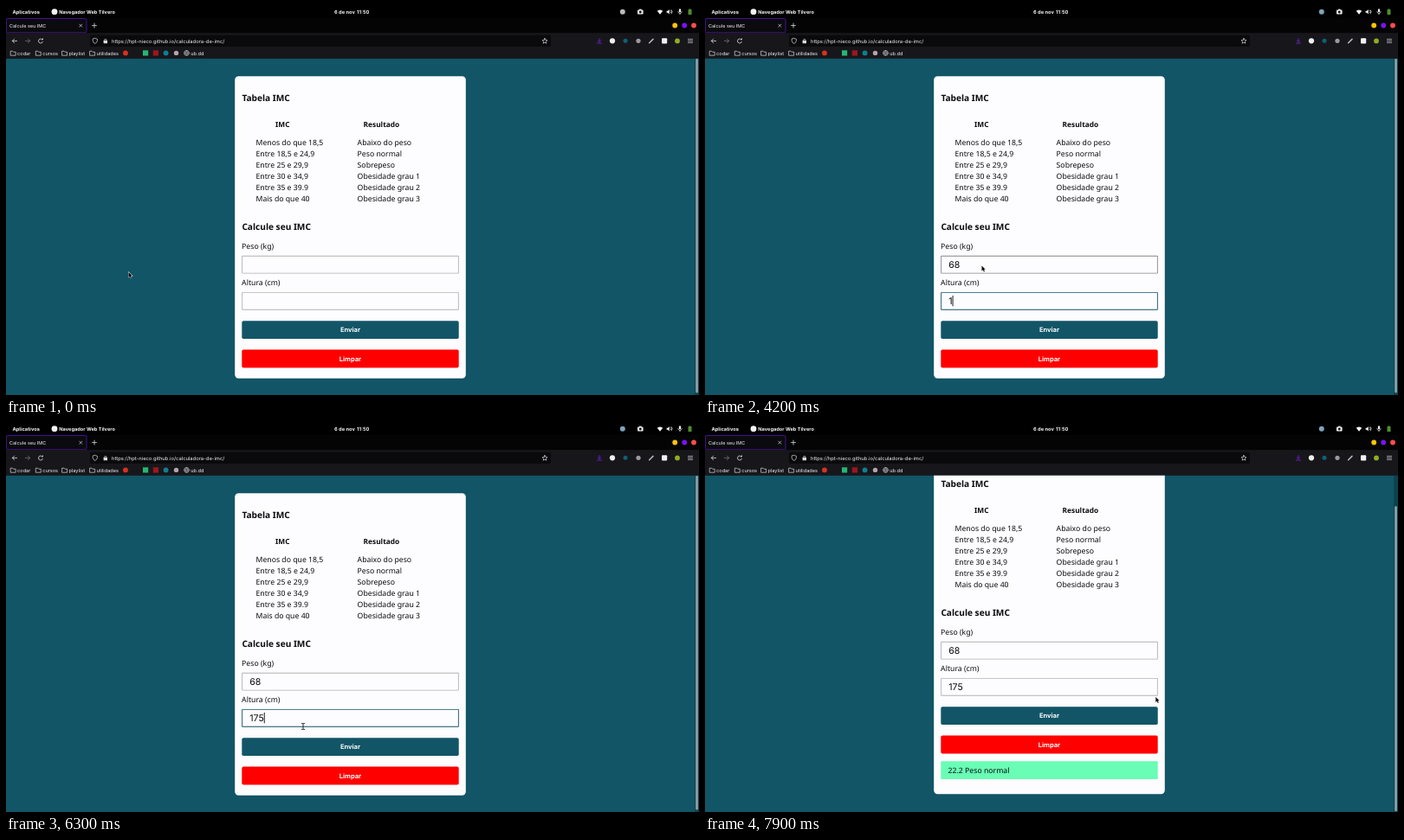
These frames come from a looping animation (800x450 px, 8 s). An HTML page with a canvas:

```html
<!DOCTYPE html>
<html lang="pt-BR">
<head>
<meta charset="utf-8">
<title>Calcule seu IMC</title>
<style>
html, body { margin: 0; width: 100%; height: 100%; overflow: hidden; background: #000; }
canvas { display: block; width: 800px; height: 450px; }
</style>
</head>
<body>
<canvas id="stage" width="800" height="450"></canvas>
<script>
const ctx = document.getElementById('stage').getContext('2d');
const LOOP = 8000, STEP = 100, TOP = 60.5;
const TEAL = '#115566', INK = '#0b0b0d';
const UI = 'Inter, sans-serif', PAGE = '"Noto Sans", "Open Sans", sans-serif';

// ---------- helpers ----------
function text(s, x, y, size, { color = INK, weight = 400, family = PAGE, align = 'left' } = {}) {
  ctx.font = `${weight} ${size}px ${family}`;
  ctx.fillStyle = color;
  ctx.textAlign = align;
  ctx.fillText(s, x, y);
}

function rect(x, y, w, h, color, r = 0) {
  ctx.fillStyle = color;
  ctx.beginPath();
  ctx.roundRect(x, y, w, h, r);
  ctx.fill();
}

function dot(x, y, r, color) {
  ctx.fillStyle = color;
  ctx.beginPath();
  ctx.arc(x, y, r, 0, Math.PI * 2);
  ctx.fill();
}

function ring(x, y, r, color, from = 0, to = Math.PI * 2, w = 0.8) {
  ctx.strokeStyle = color;
  ctx.lineWidth = w;
  ctx.beginPath();
  ctx.arc(x, y, r, from, to);
  ctx.stroke();
}

// Strokes and/or fills an SVG path placed at x, y.
function glyph(d, x, y, { stroke, fill, w = 0.8 } = {}) {
  const p = new Path2D(d);
  ctx.save();
  ctx.translate(x, y);
  ctx.lineJoin = ctx.lineCap = 'round';
  if (stroke) { ctx.strokeStyle = stroke; ctx.lineWidth = w; ctx.stroke(p); }
  if (fill) { ctx.fillStyle = fill; ctx.fill(p); }
  ctx.restore();
}

const clamp = v => Math.max(0, Math.min(1, v));
const ramp = (t, start, span) => clamp((t - start) / span);

function mix(a, b, k) {
  const ch = (c, i) => parseInt(c.slice(i, i + 2), 16);
  return `rgb(${[1, 3, 5].map(i => Math.round(ch(a, i) + (ch(b, i) - ch(a, i)) * k))})`;
}

// Last value whose start time has passed.
const pick = (list, t) => list.reduce((v, [at, next]) => (t >= at ? next : v), list[0][1]);

// ---------- motion ----------
const PATH = [
  [0, 141.5, 308], [900, 141.5, 308], [1000, 178, 325], [1100, 248, 342], [1200, 304, 335],
  [1300, 324, 311], [1400, 321, 303], [1500, 319.5, 300.5], [5800, 319.5, 300.5],
  [5900, 319.5, 301.5], [6100, 319.5, 301.5], [6200, 324, 313], [6300, 343, 351],
  [6400, 365, 382], [6500, 370.3, 370.5], [7100, 370.3, 370.5], [7200, 400, 367],
  [7300, 455, 348], [7400, 505, 325], [7500, 520.3, 317], [8000, 520.3, 317]
];

function cursorAt(t) {
  const i = Math.max(1, PATH.findIndex(p => p[0] > t));
  const [t0, x0, y0] = PATH[i - 1], [t1, x1, y1] = PATH[i];
  const k = ramp(t, t0, t1 - t0);
  return [x0 + (x1 - x0) * k, y0 + (y1 - y0) * k];
}

const SHAPES = [
  [0, 'arrow'], [1100, 'beam'], [1200, 'beam'], [1300, 'arrow'], [1400, 'beam'],
  [4100, 'arrow'], [5300, 'beam'], [6200, 'arrow'], [6300, 'beam'],
  [6400, 'hand'], [7300, 'beam'], [7400, 'beam'], [7500, 'arrow']
];
const WEIGHT = [[0, ''], [2600, '6'], [2800, '68']];
const HEIGHT = [[0, ''], [4100, '1'], [4900, '17'], [5300, '175']];
const CARET = [[0, ''], [1700, 'w'], [3300, ''], [3500, 'h'], [5700, ''], [6300, 'h'], [6700, '']];
const SCROLL = [[0, 0], [7600, 6], [7700, 20], [7800, 31], [7900, 36]];

// ---------- browser window ----------
function folder(x, label) {
  glyph('M-3 2.4V-2.2H-.6L.3-1.2H3V2.4Z', x, 54.4, { stroke: '#d8d8dc', w: 0.7 });
  text(label, x + 4.9, 56.5, 5.6, { color: '#f0f0f3', family: UI });
}

function systemBar(t) {
  const bold = { color: '#f4f4f4', weight: 700, family: UI };
  rect(0, 0, 800, 14, '#000');
  text('Aplicativos', 7.4, 8.7, 5.75, bold);
  dot(56, 6.7, 3.4, '#f4f4f4');
  text('Navegador Web Tilvero', 61.3, 8.7, 5.65, bold);
  text('6 de nov', 379, 8.7, 5.75, bold);
  text('11:50', 405, 8.7, 5.75, bold);
  dot(711.8, 6.7, 3, t < 200 ? '#b9bbbd' : '#7fa3bd');
  rect(729, 4.6, 6.6, 5, '#eee', 0.8);
  rect(731, 3.6, 2.6, 1.4, '#eee');
  dot(732.3, 7, 1.4, '#111');
  glyph('M-3.2-1.4Q0-4 3.2-1.4L0 2.6Z', 755, 7.2, { fill: '#f4f4f4' });
  glyph('M-3-1H-1.6L.2-2.8V2.8L-1.6 1H-3Z', 765.6, 6.7, { fill: '#f4f4f4' });
  ring(765.8, 6.7, 2, '#f4f4f4', -0.9, 0.9, 0.7);
  ring(765.8, 6.7, 3.2, '#f4f4f4', -0.9, 0.9, 0.7);
  rect(776.9, 3.3, 2.2, 4, '#f4f4f4', 1.1);
  ring(778, 6.2, 2.2, '#f4f4f4', 0, Math.PI, 0.7);
  rect(777.6, 8.3, 0.8, 1.8, '#f4f4f4');
  rect(787.5, 4, 4, 6, '#4f8f2c', 0.6);
  rect(788.7, 3.2, 1.6, 1, '#4f8f2c');
}

function tabBar() {
  rect(0, 13.5, 800, 18, '#040405');
  rect(0, 14.5, 93, 16.5, '#0b0a0f', 1);
  ctx.strokeStyle = '#4b159c';
  ctx.lineWidth = 0.9;
  ctx.beginPath();
  ctx.roundRect(0.4, 14.5, 92.6, 16.3, 1.5);
  ctx.stroke();
  text('Calcule seu IMC', 4, 24.6, 5.5, { color: '#f2f2f5', family: UI });
  glyph('M-1.5-1.5L1.5 1.5M1.5-1.5L-1.5 1.5', 86.3, 22.6, { stroke: '#dcdce0', w: 0.7 });
  glyph('M-2.5 0H2.5M0-2.5V2.5', 102, 22.6, { stroke: '#dcdce0', w: 0.8 });
  dot(772.2, 22.5, 2.9, '#ffc400');
  dot(783.2, 22.5, 2.9, '#7a12f5');
  dot(794, 22.5, 2.9, '#ff4d4d');
}

function navBar() {
  const icon = '#dcdce0', dim = '#707076';
  rect(0, 31.3, 800, 29.2, '#17171b');
  rect(97, 33.7, 532, 13.4, '#0a0a0d', 1.7);
  glyph('M2.6 0H-2.6M-.4-2.3L-2.7 0L-.4 2.3', 10, 40.4, { stroke: icon });
  glyph('M-2.6 0H2.6M.4-2.3L2.7 0L.4 2.3', 25, 40.4, { stroke: dim });
  ring(40, 40.5, 2.5, icon, 0.2, 5.5);
  glyph('M.6-1H2.8V-3.2Z', 40, 40.2, { fill: icon });
  glyph('M0-3L2.6-2V0Q2.3 2.2 0 3.2Q-2.3 2.2-2.6 0V-2Z', 102.8, 40.3, { stroke: icon, w: 0.7 });
  rect(112.6, 39.8, 4.4, 3.4, icon, 0.5);
  ring(114.8, 39.7, 1.4, icon, Math.PI, Math.PI * 2, 0.7);
  text('https://hpt-nieco.github.io/calculadora-de-imc/', 122, 42.6, 5.83, { color: '#f0f0f3', family: UI });
  glyph('M0-3L.9-1 3-.8 1.4.7 1.9 2.8 0 1.7-1.9 2.8-1.4.7-3-.8-.9-1Z', 622, 40.4, { stroke: icon, w: 0.7 });

  glyph('M0-2.8V1M-1.6-.5L0 1 1.6-.5M-2.6 2.6H2.6', 685, 40.4, { stroke: '#7a1fe0', w: 0.8 });
  dot(700, 40.3, 3.1, '#f0f0f0');
  dot(715, 40.3, 2.5, '#0d6275');
  dot(730, 40.3, 2.6, '#9a9aa0');
  glyph('M-2.4 2.4L2 -2', 745, 40.4, { stroke: '#b8b8bd', w: 1.5 });
  rect(757, 37.3, 6.2, 6.2, '#f2f2f2', 1);
  dot(775, 40.4, 2.9, '#8fae22');
  glyph('M-2.6-2H2.6M-2.6 0H2.6M-2.6 2H2.6', 790, 40.4, { stroke: icon, w: 0.7 });

  folder(8.2, 'codar');
  folder(37.3, 'cursos');
  folder(67.6, 'playlist');
  folder(99.6, 'utilidades');
  dot(138, 54.4, 2.9, '#d8321f');
  rect(158, 51.3, 6.2, 6.2, '#27b573');
  rect(169.8, 51.3, 6.2, 6.2, '#9c1620');
  dot(184.6, 54.4, 2.9, '#0e7f92');
  dot(196.5, 54.4, 2.7, '#b5a3a8');
  ring(208.5, 54.4, 2.8, icon, 0, Math.PI * 2, 0.7);
  glyph('M-2.8 0H2.8M0-2.8Q-2.6 0 0 2.8Q2.6 0 0-2.8', 208.5, 54.4, { stroke: icon, w: 0.5 });
  text('ub.dd', 213.2, 56.5, 5.6, { color: '#f0f0f3', family: UI });
}

// ---------- page ----------
const ROWS = [
  ['Menos do que 18,5', 'Abaixo do peso'],
  ['Entre 18,5 e 24,9', 'Peso normal'],
  ['Entre 25 e 29,9', 'Sobrepeso'],
  ['Entre 30 e 34,9', 'Obesidade grau 1'],
  ['Entre 35 e 39.9', 'Obesidade grau 2'],
  ['Mais do que 40', 'Obesidade grau 3']
];

function field(y, value, border, caret) {
  rect(272.2, y, 250.6, 20.8, border, 0.8);
  rect(273.1, y + 0.9, 248.8, 19, '#fdfcff');
  text(value, 281.2, y + 14.2, 10.6, { family: UI });
  if (caret) rect(281.3 + ctx.measureText(value).width, y + 4.2, 0.9, 12.2, '#000');
}

function button(y, label, color) {
  rect(272.3, y, 250.4, 20.9, color, 1.8);
  text(label, 397.5, y + 13.1, 7.5, { color: '#fff', weight: 700, family: UI, align: 'center' });
}

function page(t, [cx, cy]) {
  const sent = t >= 6700;
  const scroll = pick(SCROLL, t);
  const caret = pick(CARET, t);
  const inField = y => cx > 272 && cx < 523 && cy > y && cy < y + 21;
  const idle = (y, base) => (inField(y) ? '#85868c' : base);

  ctx.save();
  ctx.beginPath();
  ctx.rect(0, TOP, 800, 450 - TOP);
  ctx.clip();
  rect(0, TOP, 800, 390, TEAL);

  ctx.translate(0, -scroll);
  rect(264.2, 81.3, 266.6, sent ? 384 : 349.5, '#fdfcff', 4.2);
  text('Tabela IMC', 272.4, 109.8, 10.15, { weight: 700 });
  text('IMC', 319.3, 139.5, 8.33, { weight: 700, align: 'center' });
  text('Resultado', 433.4, 139.5, 8.33, { weight: 700, align: 'center' });
  ROWS.forEach(([range, result], i) => {
    const y = 161.1 + i * 13.03;
    text(range, 288.5, y, 8.7);
    text(result, 405.6, y, 8.7);
  });
  text('Calcule seu IMC', 272.4, 258.7, 10.15, { weight: 700 });
  text('Peso (kg)', 272.1, 281.3, 8.7);
  text('Altura (cm)', 272.1, 323.4, 8.7);

  const onWeight = ramp(t, 1600, 200) - ramp(t, 3300, 300);
  const onHeight = ramp(t, 3300, 300) - ramp(t, 6600, 300);
  const nearHeight = t >= 1100 && t < 1500 ? '#85868c' : '#b4b4b8';
  field(288.8, pick(WEIGHT, t), mix(idle(288.8, '#b0b0b4'), TEAL, onWeight), caret === 'w');
  field(330.9, pick(HEIGHT, t), mix(idle(330.9, nearHeight), TEAL, onHeight), caret === 'h');

  const hover = ramp(t, 6300, 200) - ramp(t, 7200, 200);
  button(364.2, 'Enviar', mix(TEAL, '#092e37', hover));
  button(397.6, 'Limpar', '#ff0000');
  if (sent) {
    rect(272.3, 427.2, 250.4, 20.8, '#69fdb5');
    text('22.2 Peso normal', 280.6, 440.9, 8.7);
  }
  ctx.restore();

  rect(795.2, TOP, 4.8, 390, '#0d414e');
  rect(796.2, sent ? 61 + scroll * 0.98 : 61, 2.7, sent ? 353 : 386.5, '#8fa3aa', 1.3);
}

function drawCursor(shape, [x, y]) {
  if (shape === 'beam') {
    glyph('M-1.7-3.4H-.5L0-3 .5-3.4H1.7M0-3V3M-1.7 3.4H-.5L0 3 .5 3.4H1.7', x, y, { stroke: '#111', w: 0.85 });
  } else if (shape === 'hand') {
    glyph('M.2.2Q1.2-.4 1.4.8V2.4L4.1 3Q4.7 3.2 4.5 4.4L4 7H1.2L-1.1 4.4Q-1.3 3.5 0 3.8Z', x, y,
      { stroke: '#fff', fill: '#c9ced0', w: 0.9 });
  } else {
    glyph('M0 0V5.9L1.4 4.7 2.4 6.9 3.4 6.4 2.4 4.3H4.2Z', x, y, { stroke: '#f4f4f4', fill: '#0a0a0a', w: 0.8 });
  }
}

function draw(now) {
  const t = Math.floor((now % LOOP) / STEP) * STEP;
  const at = cursorAt(t);
  ctx.textRendering = 'geometricPrecision';
  page(t, at);
  systemBar(t);
  tabBar();
  navBar();
  drawCursor(pick(SHAPES, t), at);
}

const start = performance.now();
function tick() {
  draw(performance.now() - start);
  requestAnimationFrame(tick);
}
tick();
</script>
</body>
</html>
```
